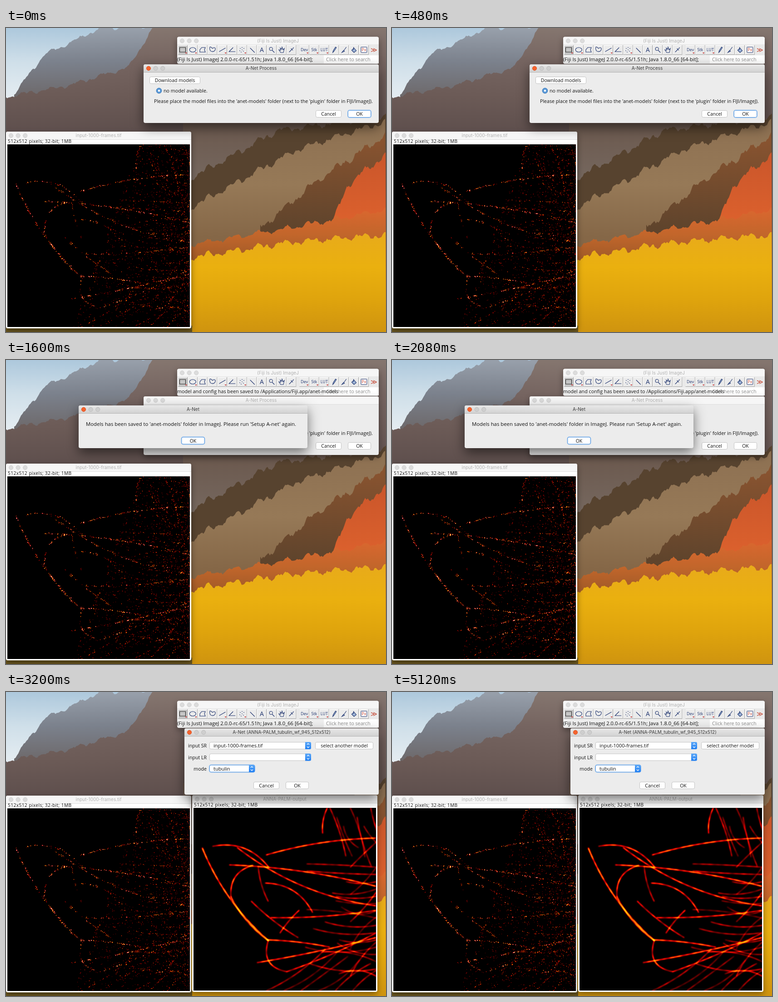
Write an HTML page with a canvas that moves like this. It is 837x669 px and loops after 6.4 s.

```html
<!DOCTYPE html>
<html lang="en">
<head>
<meta charset="utf-8">
<title>A-Net model setup</title>
<style>
html, body { margin: 0; width: 100%; height: 100%; overflow: hidden; background: #000; }
canvas { display: block; }
</style>
</head>
<body>
<canvas id="stage" width="837" height="669"></canvas>
<script>
const W = 837, H = 669, LOOP = 6400, N = 402;
let c = document.getElementById('stage').getContext('2d');

const UI = '"Open Sans", "Noto Sans", sans-serif';
const TITLE = 'Inter, Roboto, sans-serif';
const NAVY = '#20356f';

function random(seed) {
  return () => {
    seed = (seed + 0x6D2B79F5) | 0;
    let t = Math.imul(seed ^ (seed >>> 15), 1 | seed);
    t = (t + Math.imul(t ^ (t >>> 7), 61 | t)) ^ t;
    return ((t ^ (t >>> 14)) >>> 0) / 4294967296;
  };
}

function layer(w, h, draw) {
  const canvas = document.createElement('canvas');
  canvas.width = w;
  canvas.height = h;
  const before = c;
  c = canvas.getContext('2d');
  draw();
  c = before;
  return canvas;
}

// ---------- basic drawing ----------

function text(s, x, y, size, color = '#111', align = 'left', font = UI, weight = 500) {
  c.font = `${weight} ${size}px ${font}`;
  c.textAlign = align;
  c.fillStyle = color;
  c.fillText(s, x, y);
}

function fade(y0, y1, ...colors) {
  const g = c.createLinearGradient(0, y0, 0, y1);
  colors.forEach((k, i) => g.addColorStop(i / (colors.length - 1), k));
  return g;
}

function rect(x, y, w, h, fill) {
  c.fillStyle = fill;
  c.fillRect(x, y, w, h);
}

function round(x, y, w, h, r, fill, stroke, line = 1) {
  c.beginPath();
  c.roundRect(x, y, w, h, r);
  if (fill) { c.fillStyle = fill; c.fill(); }
  if (stroke) { c.strokeStyle = stroke; c.lineWidth = line; c.stroke(); }
}

function disc(x, y, r, fill, stroke) {
  round(x - r, y - r, 2 * r, 2 * r, r, fill, stroke);
}

// ---------- wallpaper ----------

// land below a jagged skyline through a few [x, y] points
function land(fill, rough, ...points) {
  const rnd = random(points.length + rough);
  c.beginPath();
  c.moveTo(points[0][0], H);
  points.slice(1).forEach(([x1, y1], i) => {
    const [x0, y0] = points[i];
    for (let x = x0; x <= x1; x += 3) {
      const wave = Math.sin(x * .11) + Math.sin(x * .29 + 1) * .6 + rnd() - .5;
      c.lineTo(x, y0 + (y1 - y0) * (x - x0) / (x1 - x0) + rough * wave);
    }
  });
  c.lineTo(W, H);
  c.fillStyle = fill;
  c.fill();
}

function wallpaper() {
  rect(0, 0, W, H, fade(0, 150, '#adc8dc', '#cfdfe9', '#e4ecf1'));
  land(fade(0, 150, '#98a0ab', '#7b818c', '#6d696b'), 3, [18, 145], [85, 58], [142, 32], [208, 0], [W, -20]);
  land(fade(0, 230, '#85766f', '#756460', '#6b5a56', '#5e4f4d'), 3, [0, 152], [140, 126], [270, 86], [330, -10], [W, -20]);
  rect(390, 200, W, H, fade(200, 330, '#6a574c', '#75675e'));
  land('#57432f', 5, [390, 340], [600, 225], [W, 195]);
  land(fade(230, 460, '#8f7253', '#967957', '#856747'), 5, [390, 405], [640, 268], [W, 205]);
  land(fade(240, 440, '#8a5430', '#5f442c'), 6, [560, 440], [700, 325], [W, 235]);
  land(fade(290, 430, '#cc572b', '#dc612d'), 6, [715, 440], [752, 345], [W, 278]);
  land(fade(400, 510, '#d9672f', '#c2662b', '#a05a28'), 4, [390, 480], [620, 440], [W, 400]);
  land(fade(455, 669, '#e8ab1a', '#eab00f', '#dfa40d', '#cf940f'), 5, [390, 508], [620, 472], [W, 455]);
  rect(0, 655, 410, 14, '#6b571f');
}

// ---------- filaments ----------

// strength, start, end, sideways bow
const arcs = [
  [.6, 19, 88, 165, 292, 15],
  [.5, 130, 126, 82, 195, 17],
  [.5, 82, 195, 165, 292, 8],
  [.5, 162, 290, 300, 306, -3],
  [.48, 42, 84, 165, 130, -20],
  [.52, 160, 103, 401, 66, -8],
  [.5, 79, 125, 401, 172, -9],
  [.46, 96, 87, 401, 215, 22],
  [.28, 142, 128, 164, 205, 4],
  [.44, 158, 165, 262, 230, -18],
  [.42, 170, 241, 401, 225, 5],
  [.36, 127, 205, 230, 285, 4],
  [.36, 232, 225, 190, 275, 2],
  [.5, 140, 340, 401, 285, 3],
  [.48, 164, 292, 205, 360, 22],
  [.4, 205, 360, 401, 275, 4],
  [.46, 294, 0, 284, 56, 4]
];

// finer strands crowd the right, top and lower edges
function fan() {
  const rnd = random(41), list = [];
  const add = (x0, y0, x1, y1, bow) => list.push([.16 + rnd() * .16, x0, y0, x1, y1, (rnd() - .5) * bow]);
  for (let i = 0; i < 16; i++) {
    const y = 130 + i * 16;
    add(N, y, N - 60 - rnd() * 110, y - 25 + rnd() * 35, 24);
  }
  for (let i = 0; i < 7; i++) add(300 + i * 15, i % 3 * 20, 335 + i * 14, 70 + rnd() * 60, 16);
  for (let i = 0; i < 6; i++) add(160 + i * 38, N, 290 + i * 25, 310 + i * 8, 20);
  for (let i = 0; i < 5; i++) add(N, 75 + i * 55, 345, 130 + i * 60, 14);
  return list;
}

const strands = [...arcs, ...fan()];

function walk([strength, x0, y0, x1, y1, bow], visit) {
  const dx = x1 - x0, dy = y1 - y0, len = Math.hypot(dx, dy);
  for (let d = 0; d < len; d++) {
    const t = d / len, lift = 4 * t * (1 - t) * bow / len;
    visit(x0 + dx * t - dy * lift, y0 + dy * t + dx * lift, strength, d);
  }
}

function splat(field, x, y, amp, sigma) {
  const r = Math.ceil(sigma * 3), cx = Math.round(x), cy = Math.round(y);
  for (let j = Math.max(0, cy - r); j <= Math.min(N - 1, cy + r); j++)
    for (let i = Math.max(0, cx - r); i <= Math.min(N - 1, cx + r); i++)
      field[j * N + i] += amp * Math.exp(-((i - x) ** 2 + (j - y) ** 2) / (2 * sigma * sigma));
}

// "red hot" colour map
function hot(field) {
  return layer(N, N, () => {
    const img = c.createImageData(N, N);
    field.forEach((v, i) => img.data.set([v * 640, v * 640 - 215, v * 640 - 455, 255], i * 4));
    c.putImageData(img, 0, 0);
  });
}

function dense() {
  const field = new Float32Array(N * N), rnd = random(7);
  for (const strand of strands) {
    const phase = rnd() * 9;
    walk(strand, (x, y, v, d) => {
      const wave = .85 + .2 * Math.sin(d * .13 + phase) + .15 * Math.sin(d * .37 + phase * 2);
      splat(field, x, y, v * wave / 3.2, 1.3);
    });
  }
  return hot(field.map(v => v < .5 ? v : .5 + (v - .5) * .35));
}

function sparse() {
  const field = new Float32Array(N * N), rnd = random(23);
  const dot = (x, y, amp) => splat(field, Math.round(x), Math.round(y), amp, .55);
  const jitter = () => (rnd() + rnd() - 1) * 2;
  for (const strand of strands) {
    const phase = rnd() * 9;
    walk(strand, (x, y, v, d) => {
      const clump = .5 + .5 * Math.sin(d * .31 + phase) * Math.sin(d * .117);
      if (rnd() < clump * (.2 + v * .8)) dot(x + jitter(), y + jitter(), .15 + rnd() ** 2 * 2 * v);
    });
  }
  for (let i = 0; i < 1300; i++) {
    const y = rnd() * N, reach = 110 + 150 * y / N;
    dot(N - reach * rnd() ** 1.5, y, .1 + rnd() ** 3 * .4);
  }
  return hot(field);
}

// ---------- windows ----------

function win(x, y, w, h, title, active, body = '#ececec') {
  c.save();
  c.shadowColor = active ? '#0008' : '#0006';
  c.shadowBlur = active ? 26 : 14;
  c.shadowOffsetY = active ? 10 : 5;
  round(x, y, w, h, 4, body);
  c.restore();
  round(x, y, w, 17, [4, 4, 0, 0], active ? fade(y, y + 17, '#e8e8e8', '#d2d2d2') : '#f6f6f6');
  rect(x, y + 17, w, 1, active ? '#b6b6b6' : '#dedede');
  for (let i = 0; i < 3; i++) {
    const on = active && i === 0;
    disc(x + 11 + i * 15.6, y + 8.8, 4.6, on ? '#f5642f' : active ? '#cfcfcf' : '#dcdcdc',
      on ? '#dc4f1f' : active ? '#bcbcbc' : '#d0d0d0');
  }
  text(title, x + w / 2, y + 12.4, 10, active ? '#3c3c3c' : '#b2b2b2', 'center', TITLE, 400);
}

function box(x, y, w, focus) {
  if (focus) round(x, y, w, 16, 4, null, '#8dbbee', 2);
  round(x + .5, y + .5, w - 1, 15, 3, '#fff', focus ? '#6ea6e2' : '#c3c3c3');
}

function button(label, x, y, w, focus) {
  box(x, y, w, focus);
  text(label, x + w / 2, y + 12, 10.5, '#111', 'center');
}

function combo(label, value, x, y, w, focus) {
  text(label, x - 6, y + 12.3, 10.6, '#111', 'right');
  box(x, y, w, focus);
  text(value, x + 9, y + 12, 11);
  round(x + w - 13, y, 13, 16, [0, 3, 3, 0], fade(y, y + 16, '#5aa7f8', '#2280f2'));
  c.strokeStyle = '#fff';
  c.lineWidth = 1.2;
  const m = x + w - 6.5;
  for (const s of [-1, 1]) {
    c.beginPath();
    c.moveTo(m - 2.5, y + 8 + s * 2);
    c.lineTo(m, y + 8 + s * 4.6);
    c.lineTo(m + 2.5, y + 8 + s * 2);
    c.stroke();
  }
}

function radio(label, x, y, on, fill = '#3d82c6') {
  disc(x, y, 5.9, on ? fill : '#fff', on ? '#3b78b5' : '#b5b5b5');
  if (on) disc(x, y, 2.2, '#fff');
  text(label, x + 10, y + 4, 10.7);
}

function picture(x, y, title, img) {
  win(x, y, 408, 433, title, false, '#fff');
  c.letterSpacing = '.4px';
  text('512x512 pixels; 32-bit; 1MB', x + 4, y + 25, 10.2);
  c.letterSpacing = '0px';
  c.drawImage(img, x + 3, y + 28);
}

// ---------- toolbar ----------

const icons = [
  'M-7-5H6V5H-7Z', 'M-7 0A7 5 0 1 1 7 0A7 5 0 1 1-7 0', 'M-6 5V0L-2-5H6L4 0L6 5Z',
  'M0-3C3-6 8-5 6 0S-5 6-6-2S-2-5 0-3', 'M-7 4L7-4', 'M7 4H-7L2-5',
  'M-5-3h2M-1-5h2M3-3h2M-6 2h2M-1 0h2M2 3h2M-3 5h2', 'M-4-4L6 6', 'A',
  'M-5-2A3.5 3.5 0 1 1 2-2A3.5 3.5 0 1 1-5-2M1 1L6 6',
  'M-2 6L-6 0L-2 1L-3-4L0-1L1-6L3 0L6-3L4 6Z', 'M-5 5L1-1M-1-3L3 1M2-2L5-5',
  'Dev', 'Stk', 'LUT', 'M-3 6L-2 2L3-6L5-5L0 3Z', 'M-5 6L-1 1L1 3ZM0 1L5-6', 'M-5 1L0-4L5 2L0 6ZM-1-6V0', 'Px', '≫'
];
const withMenu = [0, 1, 4, 6, 12, 13, 14];

function tool(icon, i) {
  const x = i < 12 ? 379 + i * 21.75 : 646.5 + (i - 12) * 21.9, y = 38;
  const last = icon === '≫';
  if (!last) {
    rect(x, y, 21, 21, '#a6a6a6');
    rect(x, y, 20, 20, '#fff');
    rect(x + 1, y + 1, 19, 19, i ? '#ebebeb' : '#c6c6c6');
  }
  c.save();
  c.translate(x + 10.5, y + 10);
  if (icon[0] === 'M') {
    const path = new Path2D(icon);
    c.strokeStyle = i ? NAVY : '#222';
    c.lineWidth = 1.1;
    if (i > 14) { c.fillStyle = '#9fb6d8'; c.fill(path); }
    c.stroke(path);
  } else {
    const big = last || icon === 'A', red = last || icon === 'Px';
    if (icon === 'Px') round(-6.5, -6, 13, 12, 1, '#fff', NAVY);
    text(icon, 0, big ? 5 : 3.2, big ? 14 : 9, red ? '#c4402c' : NAVY, 'center');
  }
  if (withMenu.includes(i)) {
    c.fillStyle = '#c42626';
    c.fill(new Path2D('M5 6H9.5L7.2 8.6Z'));
  }
  c.restore();
}

function toolbar() {
  win(377, 19.5, 444, 59.5, '(Fiji Is Just) ImageJ', false, '#f0f0f0');
  rect(377, 37, 444, 23, '#e9e9e9');
  icons.forEach(tool);
  rect(700, 60, 121, 18, '#fff');
  text('Click here to search', 705, 73, 10.75, '#8c8c8c', 'left', UI, 400);
}

// ---------- scenes ----------

const NOTE = "Please place the model files into the 'anet-models' folder (next to the 'plugin' folder in FIJI/ImageJ).";
const VERSION = '(Fiji Is Just) ImageJ 2.0.0-rc-65/1.51h; Java 1.8.0_66 [64-bit];';
const SAVED = 'model and config has been saved to /Applications/Fiji.app/anet-models';

function status(s, size = 10.75) {
  text(s, 377, 73, size);
}

function noModels(active) {
  win(303, 80, 518, 129, 'A-Net Process', active);
  button('Download models', 316, 107, 112);
  radio('no model available.', 337, 138, true, '#5c9ad8');
  text(NOTE, 326, 165, 10.65);
  button('Cancel', 682, 181, 57);
  button('OK', 753, 181, 51, active);
}

function message(x, y, w, s) {
  win(x, y, w, 94, 'A-Net', true);
  text(s, x + 16, y + 44.5, 11.35);
  button('OK', x + w / 2 - 25.5, y + 69.5, 51, true);
}

const scenes = [
  () => {
    status(VERSION, 11.2);
    noModels(true);
  },
  () => {
    status('download tubulin_model_demo');
    noModels(false);
    message(180, 104, 588, 'Please notice that downloading models may take a while, the model list will be updated when it finished.');
  },
  () => {
    status(SAVED);
    noModels(false);
    message(160, 100, 504, "Models has been saved to 'anet-models' folder in ImageJ. Please run 'Setup A-net' again.");
  },
  () => {
    status(SAVED);
    win(247, 79, 576, 148, 'A-Net Process', true);
    button('Download models', 260, 106, 112);
    button('Run', 761, 106, 49);
    radio('ANNA-PALM_npc_tubulin_946b_512x512', 281, 137.5, true);
    radio('ANNA-PALM_tubulin_wf_945_512x512', 281, 155.5, false);
    text(NOTE, 270, 182, 10.65);
    button('Cancel', 626, 198.5, 57);
    button('OK', 697, 198.5, 51, true);
  },
  () => {
    status(VERSION, 11.2);
    picture(410, 227, 'ANNA-PALM-output', output);
    win(393, 80, 428, 146, 'A-Net (ANNA-PALM_tubulin_wf_945_512x512)', true);
    combo('input SR', 'input-1000-frames.tif', 448, 110, 224);
    combo('input LR', '', 448, 135.5, 224);
    combo('mode', 'tubulin', 448, 160.5, 100, true);
    button('select another model', 681, 110, 128);
    button('Cancel', 545, 197.5, 57);
    button('OK', 616, 197.5, 51);
  }
];

const output = dense();
const desktop = layer(W, H, () => {
  wallpaper();
  picture(0, 228, 'input-1000-frames.tif', sparse());
  toolbar();
});

let shown = -1;
function tick() {
  const step = Math.min(4, Math.floor(performance.now() % LOOP / 800));
  if (step !== shown) {
    shown = step;
    c.drawImage(desktop, 0, 0);
    scenes[step]();
  }
  requestAnimationFrame(tick);
}
tick();
</script>
</body>
</html>
```
